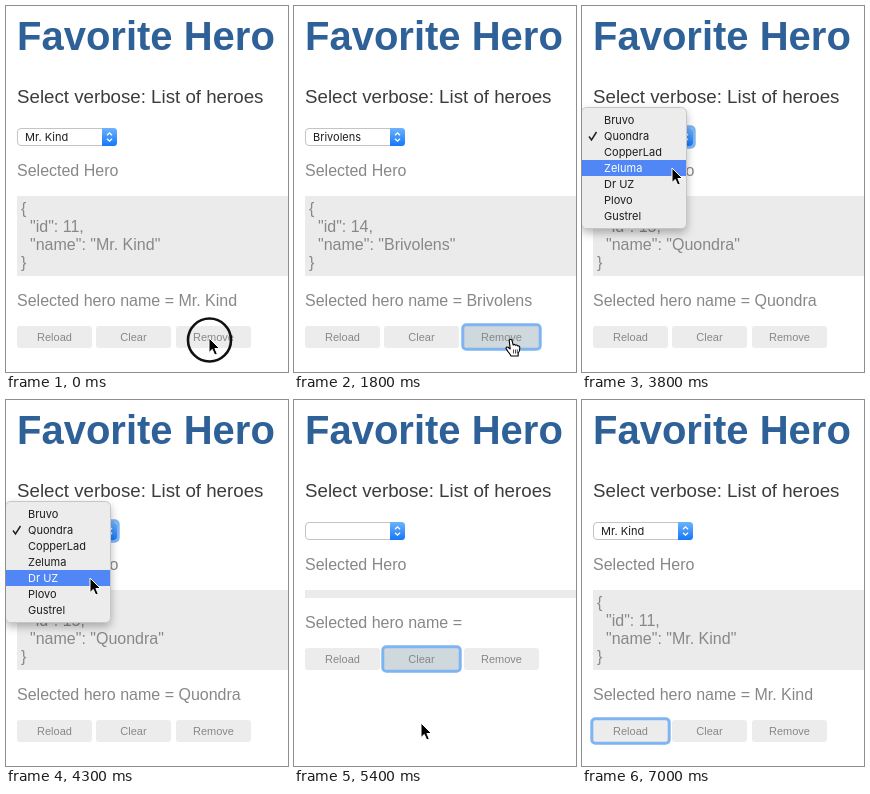
An HTML page for the animation above (7.8 s loop, 282 by 366 pixels).

```html
<!DOCTYPE html>
<html lang="en">
<head>
<meta charset="utf-8">
<title>Favorite Hero</title>
<style>
  html, body { margin: 0; width: 100%; height: 100%; overflow: hidden; background: #fff; }
  svg { display: block; width: 282px; height: 366px; }
  text { font: 16px "Liberation Sans", Arial, sans-serif; fill: #888; }
  .title { font-size: 40px; font-weight: bold; fill: #2f6199; }
  .head { font-size: 18.72px; fill: #3c3c3c; }
  .label { font-size: 11px; text-anchor: middle; }
  .ui { font: 11px Inter, Roboto, sans-serif; fill: #1c1c1c; }
</style>
</head>
<body>
<svg id="stage" viewBox="0 0 282 366"></svg>
<script>
const LOOP = 7800, STEP = 100;
const stage = document.getElementById('stage');

const calm = { id: 11, name: 'Mr. Kind' };
const heroes = [
  [0, calm],
  [1100, { id: 13, name: 'Hulgomar' }],
  [1800, { id: 14, name: 'Brivolens' }],
  [2100, { id: 15, name: 'Quondra' }],
  [4500, { id: 18, name: 'Dr UZ' }],
  [5400, null],
  [6700, calm]
];
const focuses = [[0, ''], [1000, 'Remove'], [3400, 'select'], [5400, 'Clear'], [6600, 'Reload']];
const options = ['Bruvo', 'Quondra', 'CopperLad', 'Zeluma', 'Dr UZ', 'Plovo', 'Gustrel'];
const buttons = [['Reload', 11], ['Clear', 90], ['Remove', 170]];

// time, x, y
const path = [
  [0, 203, 332], [500, 203, 332], [700, 217, 333], [2400, 217, 333],
  [3200, 107, 134], [3600, 107, 134], [3800, 90, 162], [4100, 84, 178],
  [4400, 84, 178], [4700, 132, 286], [5200, 127, 323], [5600, 127, 323],
  [6200, 48, 262], [6700, 48, 262], [7000, 290, 250]
];

const at = (list, t) => list.filter(e => e[0] <= t).pop()[1];
const rect = (x, y, w, h, fill, rest = '') =>
  `<rect x="${x}" y="${y}" width="${w}" height="${h}" fill="${fill}" ${rest}/>`;
const text = (x, y, s, cls = '', rest = '') => `<text x="${x}" y="${y}" class="${cls}" ${rest}>${s}</text>`;
const ring = (x, y, w, h) =>
  rect(x - 1.2, y - 1.2, w + 2.4, h + 2.4, 'none', 'rx="3.5" stroke="#7fb4f2" stroke-width="3"');
const inside = (p, x, y, w, h) => p.x >= x && p.x <= x + w && p.y >= y && p.y <= y + h;

function pointer(t) {
  const i = path.findIndex(k => k[0] > t);
  if (i < 0) return { x: 400, y: 0 };
  const [t0, x0, y0] = path[i - 1], [t1, x1, y1] = path[i];
  const u = (t - t0) / (t1 - t0), e = u * u * (3 - 2 * u);
  return { x: x0 + (x1 - x0) * e, y: y0 + (y1 - y0) * e };
}

// The block below the JSON box moves up when it is empty
const lift = t => at(heroes, t) ? 0 : -72;

function hovered(p, t) {
  if (t < 600) return '';
  const hit = buttons.find(b => inside(p, b[1], 320 + lift(t), 75, 22));
  return hit ? hit[0] : '';
}

function page(t, hero, p) {
  const dy = lift(t), focus = at(focuses, t), hot = hovered(p, Math.max(0, t - STEP));
  let s = text(11, 44, 'Favorite Hero', 'title')
    + text(11, 97, 'Select verbose: List of heroes', 'head')
    + text(11, 170, 'Selected Hero')
    + rect(11, 190, 271, 80 + dy, '#ebebeb')
    + text(11, 300 + dy, 'Selected hero name = ' + (hero ? hero.name : ''));
  if (hero) {
    s += text(15, 208, '{') + text(24, 226, `"id": ${hero.id},`)
      + text(24, 244, `"name": "${hero.name}"`) + text(15, 262, '}');
  }
  for (const [name, x] of buttons) {
    s += rect(x, 320 + dy, 75, 22, hot === name ? '#cfd8dc' : '#ececec', 'rx="3"')
      + text(x + 37.5, 335 + dy, name, 'label');
    if (focus === name) s += ring(x, 320 + dy, 75, 22);
  }
  return s + select(hero, focus === 'select');
}

function select(hero, focused) {
  return (focused ? ring(11, 122, 100, 18) : '')
    + rect(11.5, 122.5, 99, 17, '#fff', 'rx="3.5" stroke="#c4c4c4"')
    + '<path d="M96 122h11.5q3.500 0 3.500 3.500v11q0 3.500-3.500 3.500H96z" fill="url(#blue)"/>'
    + '<path d="M101 129.300l2.500-2.500 2.500 2.500M101 132.700l2.500 2.500 2.500-2.500" fill="none" stroke="#fff" stroke-width="1.300"/>'
    + text(19, 135, hero ? hero.name : '', 'ui');
}

function menu(hero, p) {
  let s = rect(-.5, 101.5, 105, 121, '#ececec', 'rx="5" stroke="#c6c6c6" filter="url(#shade)"');
  options.forEach((name, i) => {
    const y = 106 + i * 16, on = inside(p, 0, y, 104, 15.9);
    if (on) s += rect(0, y, 104, 16, '#5086f5');
    s += text(22, y + 12, name, 'ui', on ? 'style="fill:#fff"' : '');
    if (name === hero.name)
      s += `<path d="M7 ${y + 8.5}l2.500 3.500 5-8" fill="none" stroke="${on ? '#fff' : '#222'}" stroke-width="1.500"/>`;
  });
  return s;
}

function overText(p, dy) {
  return inside(p, 11, 82, 247, 19) || inside(p, 11, 155, 101, 19)
    || (!dy && inside(p, 11, 194, 145, 72)) || inside(p, 11, 285 + dy, 222, 18);
}

function cursor(t, p, open) {
  let shape = '<path d="M0 0V14.500l3.300-3.100 2.400 5.600 2.600-1.100-2.400-5.400H10.500z" fill="#000" stroke="#fff" stroke-width="1"/>';
  if (!open && hovered(p, t)) {
    shape = '<path d="M-1.800 1.300Q-.5-.6.9 1.200L2.200 6Q3.500 4.700 4.400 6.300 5.900 5.300 6.700 7 8.600 6.500 8.800 8.600 9 12 7.200 14V17H0Q-1-14.600 0 17-1.200 14.500-3 12.600L-5 9.500Q-5 7.500-3 8.200L-.8 10z" fill="#fff" stroke="#000" stroke-width="1.100" stroke-linejoin="round"/>'
      .replace('Q-1-14.600 0 17-1.200 14.500-3 12.600', 'Q-1.200 14.500-3 12.600')
      + '<path d="M2.500 10.500v4M4.500 10.500v4M6.300 10.500v4" stroke="#000" stroke-width=".7"/>';
  } else if (!open && overText(p, lift(t))) {
    shape = '<path d="M-3-7.500Q0-7.500 0-5.500 0-7.500 3-7.500M0-5.500V5.500M-3 7.500Q0 7.500 0 5.500 0 7.500 3 7.500M-2 3H2" fill="none" stroke="#222" stroke-width="1.200"/>';
  }
  return `<g transform="translate(${p.x} ${p.y})">${shape}</g>`;
}

const defs = `<defs>
  <linearGradient id="blue" x2="0" y2="1"><stop stop-color="#6cb3fa"/><stop offset="1" stop-color="#1677fb"/></linearGradient>
  <filter id="shade" x="-20%" y="-20%" width="140%" height="140%"><feDropShadow dx="0" dy="4" stdDeviation="4" flood-opacity=".28"/></filter>
</defs>`;

function draw(t) {
  const hero = at(heroes, t), p = pointer(t), open = t >= 3400 && t < 4500;
  stage.innerHTML = defs + page(t, hero, p)
    + (open ? menu(hero, p) : '')
    + (t < 200 ? '<circle cx="203.500" cy="334" r="21.500" fill="none" stroke="#111" stroke-width="2.600"/>' : '')
    + cursor(t, p, open);
}

let start, last = -1;
function tick(now) {
  start ??= now;
  const t = Math.floor((now - start) % LOOP / STEP) * STEP;
  if (t !== last) draw(last = t);
  requestAnimationFrame(tick);
}
draw(0);
requestAnimationFrame(tick);
</script>
</body>
</html>
```
